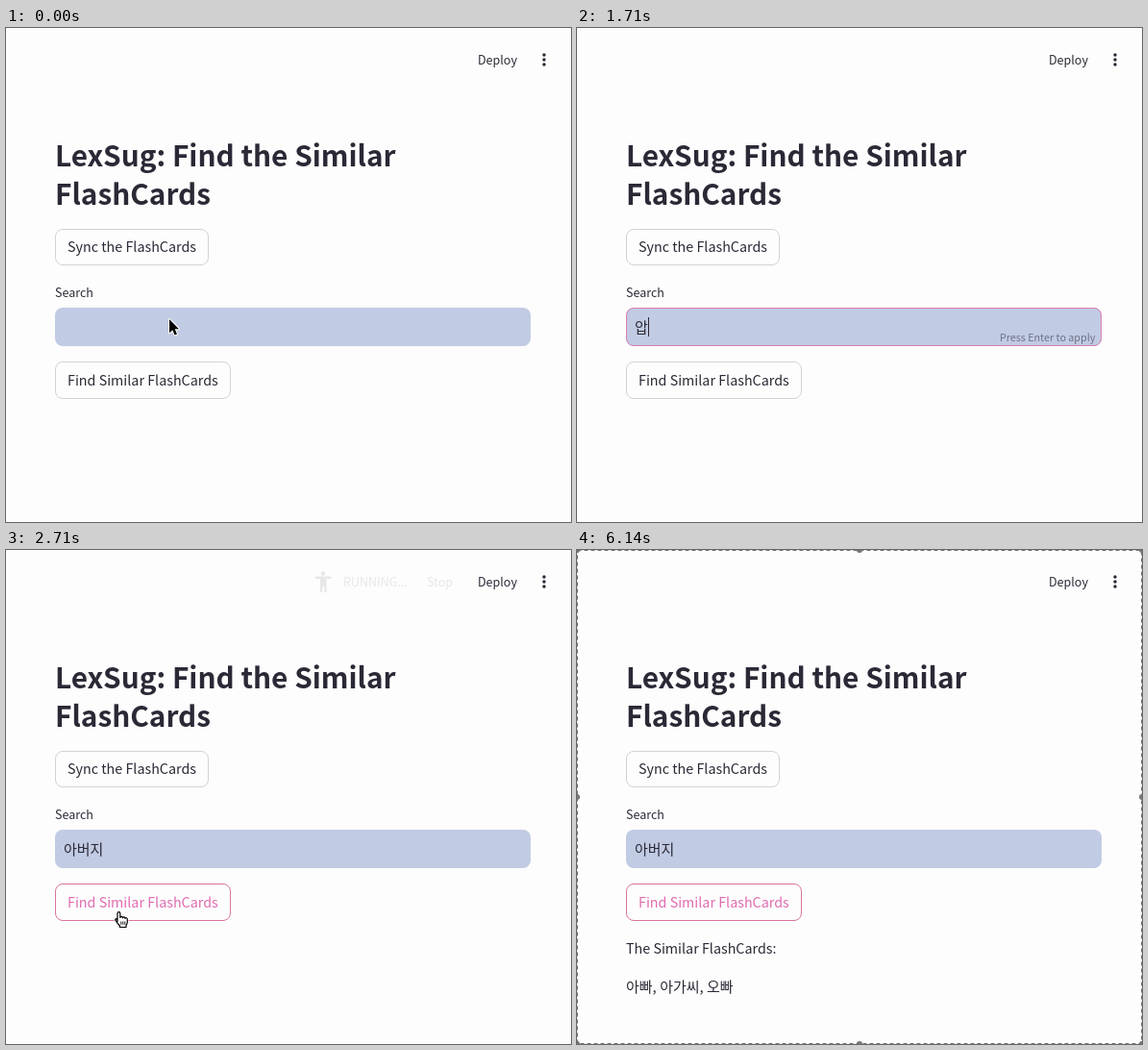
Animation of 588x514 px, one loop 6710 ms. Source, as an HTML page with a canvas:

```html
<!DOCTYPE html>
<html lang="en">
<head>
<meta charset="utf-8">
<title>Similar flashcards</title>
<style>
  html, body { margin: 0; width: 100%; height: 100%; overflow: hidden; background: #fdfdfd; }
  canvas { display: block; width: 588px; height: 514px; }
</style>
</head>
<body>
<canvas id="stage"></canvas>
<script>
const W = 588, H = 514, LOOP = 6710;
const INK = '#2b2936', PINK = '#e06bb0', PAPER = '#fdfdfd';
const FAMILY = '"Noto Sans CJK KR", "Noto Sans CJK JP", "Noto Sans CJK", "Noto Sans", sans-serif';

const canvas = document.getElementById('stage');
const ctx = canvas.getContext('2d');
const ratio = window.devicePixelRatio || 1;
canvas.width = W * ratio;
canvas.height = H * ratio;

// Each entry changes part of the state and holds until the next one.
const steps = [
  [0, { pointer: 'arrow', x: 170, y: 303, typed: '', focus: false, menu: false,
        hot: false, status: 0, result: false, frame: false }],
  [140, { pointer: 'beam', x: 162, y: 312 }],
  [290, { x: 153 }],
  [570, { x: 130 }],
  [720, { x: 102 }],
  [860, { x: 88, focus: true }],
  [1000, { menu: true }],
  [1430, { pointer: '', menu: false, typed: 'ㅇ' }],
  [1570, { typed: '아' }],
  [1710, { typed: '압' }],
  [1860, { typed: '아버' }],
  [2000, { typed: '아벚' }],
  [2140, { typed: '아버지' }],
  [2290, { pointer: 'arrow', x: 114, y: 391 }],
  [2430, { pointer: 'hand', x: 113, y: 376, hot: true }],
  [2570, { focus: false }],
  [2710, { status: 0.1 }],
  [2860, { status: 0.4 }],
  [3000, { status: 0.6, pointer: '' }],
  [3140, { result: true }],
  [3290, { status: 0 }],
  [5570, { frame: true }]
];

function stateAt(t) {
  return Object.assign({}, ...steps.filter(s => s[0] <= t).map(s => s[1]));
}

function text(str, x, y, size, color = INK, weight = 400) {
  ctx.font = `${weight} ${size}px ${FAMILY}`;
  ctx.fillStyle = color;
  ctx.fillText(str, x, y);
}

function box(x, y, w, h, r, fill, stroke) {
  ctx.beginPath();
  ctx.roundRect(x, y, w, h, r);
  ctx.fillStyle = fill;
  ctx.fill();
  if (!stroke) return;
  ctx.beginPath();
  ctx.roundRect(x + 0.5, y + 0.5, w - 1, h - 1, r - 0.5);
  ctx.lineWidth = 1;
  ctx.strokeStyle = stroke;
  ctx.stroke();
}

function dot(x, y, r, color) {
  ctx.beginPath();
  ctx.arc(x, y, r, 0, Math.PI * 2);
  ctx.fillStyle = color;
  ctx.fill();
}

function button(label, y, w, h, hot) {
  box(51, y, w, h, 8, PAPER, hot ? '#d9759f' : '#d3d3d7');
  text(label, 64, y + (h > 38 ? 25 : 24), 14.32, hot ? PINK : INK);
}

function search(s) {
  box(51, 291, 495, 40, 8, '#c1cbe3', s.focus && '#de7db4');
  text(s.typed, 60, 317, 15);
  if (!s.focus) return;
  const caret = 60 + Math.round(ctx.measureText(s.typed).width);
  ctx.fillStyle = INK;
  ctx.fillRect(caret, 301, 1, 20);
  if (s.typed) text('Press Enter to apply', 440, 326, 10.74, '#6d7287');
}

function menu() {
  box(151, 340, 156, 44, 6, '#1a1a1a');
  ctx.fill(new Path2D('M160 341L169.5 333Q171 331.600 172.500 333L182 341Z'));
  text('동생', 163, 367, 12.5, '#e6e6e6', 700);
}

function status(alpha) {
  ctx.save();
  ctx.globalAlpha = alpha;
  dot(330, 24.500, 2.3, INK);
  ctx.fill(new Path2D('M322 27.500H338.500V30H333.500V44H331.300V37.500H329.200V44H327V30H322Z'));
  text('RUNNING...', 351, 38, 12.53);
  text('Stop', 438, 38, 12.53);
  ctx.restore();
}

const arrow = new Path2D('M0 0V14.200L3.300 11.200L5.600 16.500L8 15.500L5.700 10.300H10Z');
const beam = new Path2D('M-3.500 -7.500Q-.500 -7.500 0 -6Q.500 -7.500 3.500 -7.500M0 -6V6M-3.500 7.500Q-.500 7.500 0 6Q.500 7.500 3.500 7.500M-1.500 1.500H1.500');
const hand = new Path2D('M3 10.500V2.200Q3 .700 4.400 .700T5.800 2.200V6.500Q6 5.200 7.200 5.300T8.400 6.800Q8.700 5.700 9.800 5.900T11 7.400Q11.300 6.500 12.300 6.800T13.300 8.300V11Q13.300 13 12 14.500V16.500H5.500V15Q3.500 13 2.400 11.300L.900 9.200Q.400 8.200 1.200 7.700T3 9Z');
const fingers = new Path2D('M6.800 10.500V13.800M8.800 10.500V13.800M10.800 10.500V13.800');

function stroke(path, width, color) {
  ctx.lineWidth = width;
  ctx.strokeStyle = color;
  ctx.stroke(path);
}

function pointer(kind, x, y) {
  ctx.save();
  ctx.translate(x, y);
  ctx.lineJoin = 'round';
  if (kind === 'arrow') {
    stroke(arrow, 2, '#fff');
    ctx.fillStyle = '#000';
    ctx.fill(arrow);
  } else if (kind === 'beam') {
    stroke(beam, 2.8, '#eef1f8');
    stroke(beam, 1.2, '#111');
  } else if (kind === 'hand') {
    stroke(hand, 2.6, '#fff');
    ctx.fillStyle = '#fff';
    ctx.fill(hand);
    stroke(hand, 1.2, '#000');
    stroke(fingers, 0.9, '#000');
  }
  ctx.restore();
}

function selection() {
  ctx.save();
  ctx.setLineDash([4, 3]);
  ctx.lineWidth = 1;
  ctx.strokeStyle = '#777';
  ctx.strokeRect(0.5, 0.5, W - 1, H - 1);
  ctx.restore();
  for (const x of [0, W / 2, W]) {
    for (const y of [0, H / 2, H]) {
      if (x !== W / 2 || y !== H / 2) dot(x, y, 3, '#777');
    }
  }
}

function draw(t) {
  const s = stateAt(t);
  ctx.setTransform(ratio, 0, 0, ratio, 0, 0);
  ctx.fillStyle = PAPER;
  ctx.fillRect(0, 0, W, H);

  if (s.status) status(s.status);
  text('Deploy', 491, 38, 12.53);
  for (const y of [28, 33, 38]) dot(560, y, 1.75, INK);

  text('LexSug: Find the Similar', 51, 144, 29.8, INK, 700);
  text('FlashCards', 51, 184, 29.8, INK, 700);
  button('Sync the FlashCards', 209, 160, 38, false);
  text('Search', 51, 280, 12.53);
  search(s);
  button('Find Similar FlashCards', 347, 183, 39, s.hot);
  if (s.result) {
    text('The Similar FlashCards:', 51, 420, 14.32);
    text('아빠, 아가씨, 오빠', 51, 460, 15);
  }
  if (s.menu) menu();
  pointer(s.pointer, s.x, s.y);
  if (s.frame) selection();
}

const start = performance.now();
function tick() {
  draw((performance.now() - start) % LOOP);
  requestAnimationFrame(tick);
}
draw(0);
requestAnimationFrame(tick);
</script>
</body>
</html>
```
